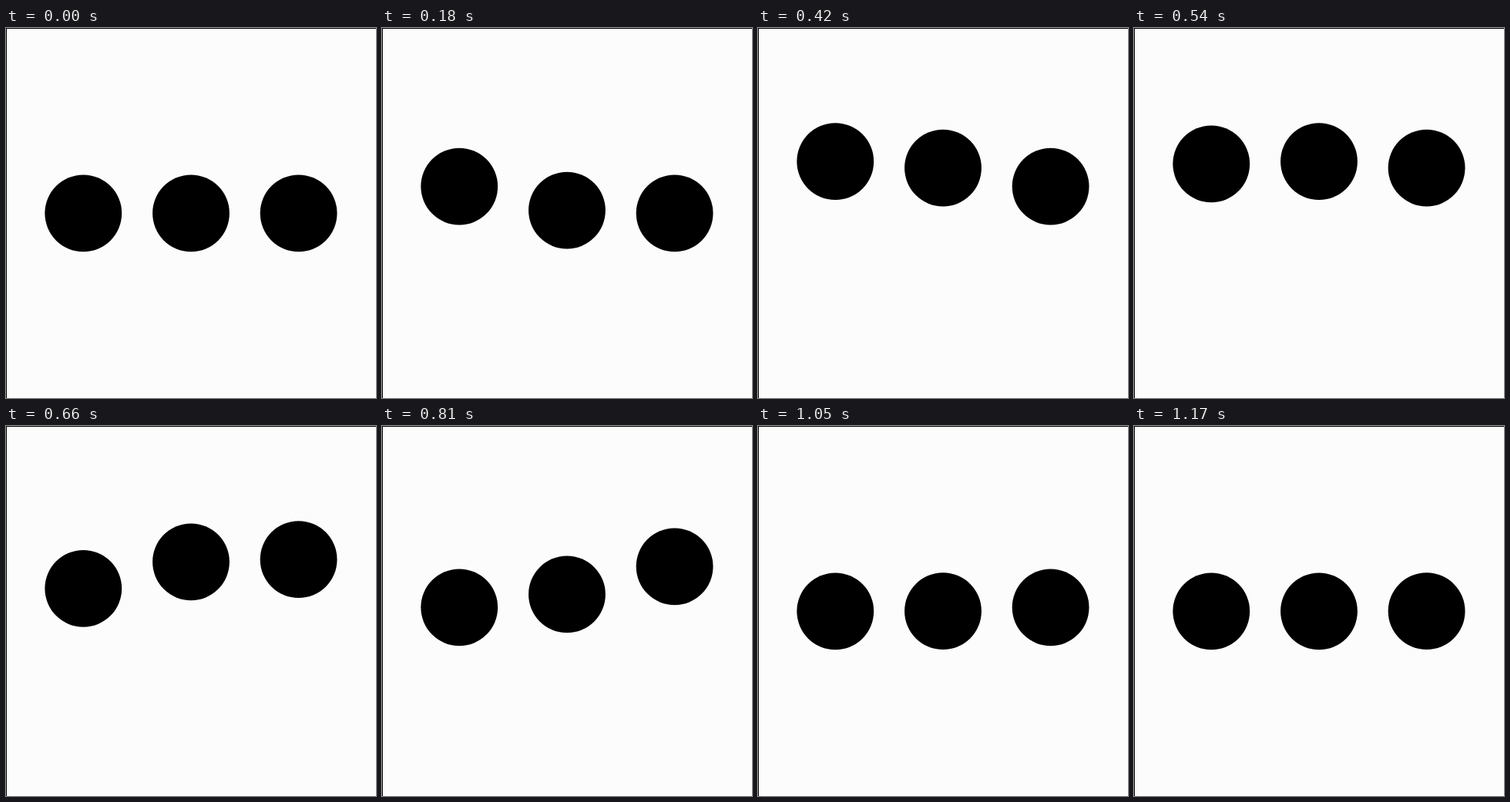
Recreate the animation shown at these times as an HTML page. Size 480 by 480 pixels, loop 1.2 s.

```html
<!DOCTYPE html>
<html lang="en">
<head>
<meta charset="utf-8">
<title>Three bouncing dots</title>
<style>
  html, body { margin: 0; width: 100%; height: 100%; overflow: hidden; background: #fcfcfc; }
  svg { display: block; width: 100vw; height: 100vh; }
</style>
</head>
<body>
<svg viewBox="0 0 480 480">
  <rect width="480" height="480" fill="#fcfcfc"/>
  <path d="M0 0H480V1H1V480H0Z" fill="#000"/>
  <g fill="#000">
    <circle cx="100.3" cy="240.35" r="49.9"/>
    <circle cx="240" cy="240.35" r="49.9"/>
    <circle cx="379.6" cy="240.35" r="49.9"/>
  </g>
</svg>
<script>
  const LOOP = 1200, STEP = 30, DELAY = 120, HALF = 480;
  const REST = 240.35, TOP = 172.3;
  const dots = document.querySelectorAll('circle');

  // Cubic bezier easing with handles (x1, 0) and (x2, 1).
  function bezier(x1, x2) {
    return p => {
      if (p <= 0) return 0;
      if (p >= 1) return 1;
      let lo = 0, hi = 1, s = 0.5;
      for (let i = 0; i < 24; i++) {
        s = (lo + hi) / 2;
        const r = 1 - s;
        const x = 3 * x1 * s * r * r + 3 * x2 * s * s * r + s * s * s;
        if (x < p) lo = s; else hi = s;
      }
      return s * s * (3 - 2 * s);
    };
  }

  const rise = bezier(0.335, 0.317);
  const fall = bezier(0.337, 0.246);

  function height(t) {
    return t < HALF ? rise(t / HALF) : 1 - fall((t - HALF) / HALF);
  }

  function draw(ms) {
    const t = Math.floor((ms % LOOP + 0.5) / STEP) * STEP % LOOP;
    dots.forEach((dot, i) => {
      const y = REST - (REST - TOP) * height(t - i * DELAY);
      dot.setAttribute('cy', y.toFixed(2));
    });
  }

  let start = null;
  function tick() {
    const now = performance.now();
    if (start === null) start = now;
    draw(now - start);
    requestAnimationFrame(tick);
  }

  draw(0);
  requestAnimationFrame(tick);
</script>
</body>
</html>
```
